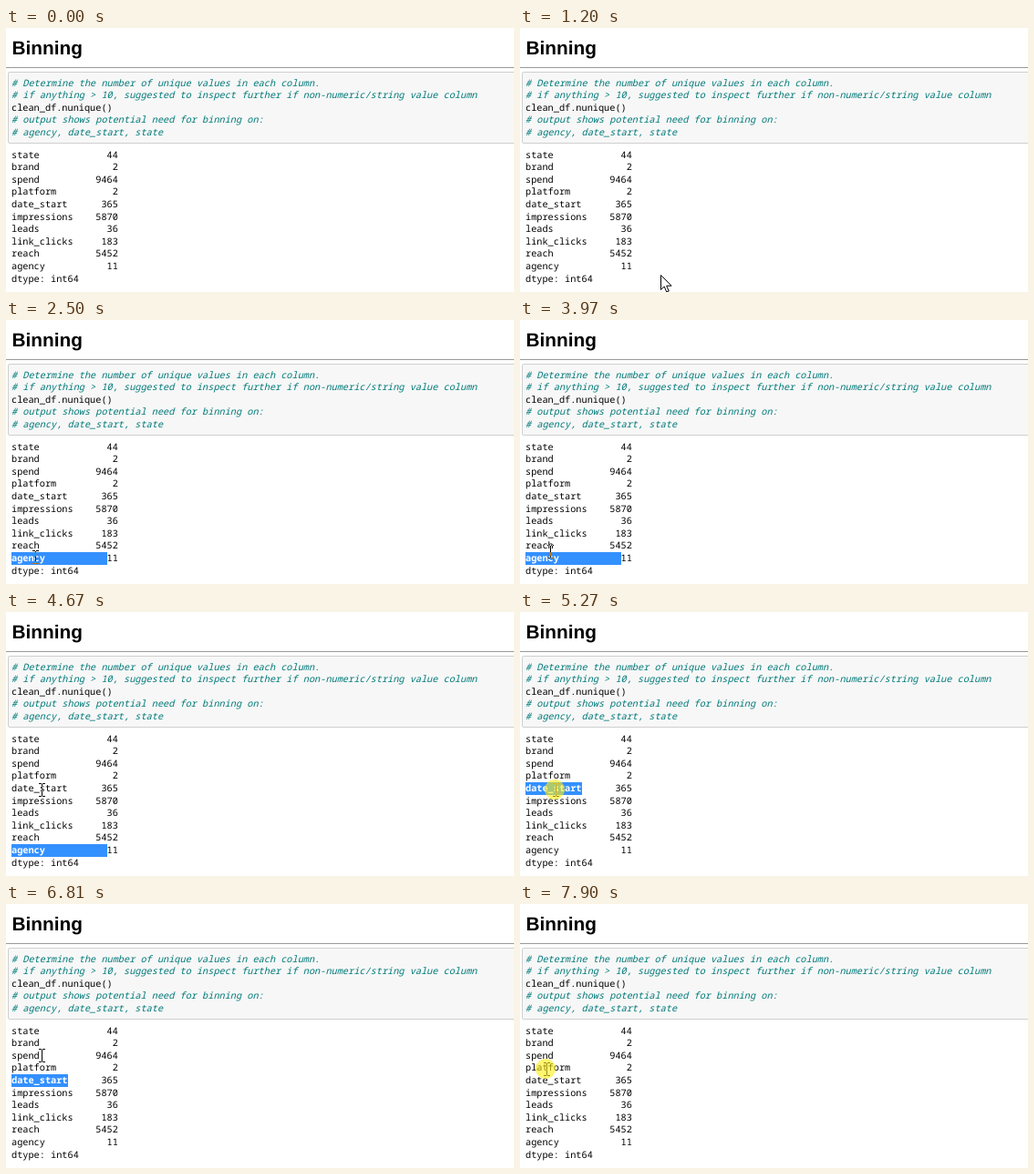
An HTML page for the animation above (8 s loop, 557 px wide and 290 px high).

```html
<!DOCTYPE html>
<html lang="en">
<head>
<meta charset="utf-8">
<title>Binning</title>
<style>
  html, body { margin: 0; height: 100%; overflow: hidden; background: #fff; }
  svg { display: block; width: 557px; height: 290px; }
  text { white-space: pre; text-rendering: geometricPrecision; }
  .mono { font: 10.267px "Noto Sans Mono", "DejaVu Sans Mono", monospace; }
  .note { font-style: italic; fill: #007979; }
  .title { font: bold 20.8px "Liberation Sans", Arial, sans-serif; }
  .sel rect { fill: #3390ff; }
  .sel text { fill: #fff; font-weight: 600; }
  #beam { fill: none; stroke: #fff; mix-blend-mode: difference; }
</style>
</head>
<body>
<svg viewBox="0 0 557 290">
  <rect width="557" height="290" fill="#fff"/>
  <text class="title" x="6.5" y="29">Binning</text>
  <path d="M0 43.5H557" stroke="#999"/>
  <rect x="2.5" y="48.5" width="570" height="78" rx="1.6" fill="#f7f7f7" stroke="#cfcfcf"/>
  <g id="page"></g>
  <path id="beam" d="M-3.5-7H-.5M.5-7H3.5M0-6.5V6.5M-3.5 7H-.5M.5 7H3.5"/>
  <circle id="spot" cx="-1.5" cy="-.5" r="11" fill="#ffee14" fill-opacity=".6"/>
  <path id="arrow" d="M0 0V16L3.7 12.5 6.3 18.5 8.7 17.5 6.2 11.7H11.5Z" fill="#fff" stroke="#000"/>
</svg>
<script>
const $ = id => document.getElementById(id);
const NS = "http://www.w3.org/2000/svg";
const LOOP = 8000, STEP = 70, DOUBLE = 200;
const LEFT = 6, CHAR = 6.16, LINE = 13.6, CODE_Y = 64, OUT_Y = 143, OUT_COLS = 19;

const code = [
  "# Determine the number of unique values in each column.",
  "# if anything > 10, suggested to inspect further if non-numeric/string value column",
  "clean_df.nunique()",
  "# output shows potential need for binning on:",
  "# agency, date_start, state"
];
const counts = {
  state: 44, brand: 2, spend: 9464, platform: 2, date_start: 365, impressions: 5870,
  leads: 36, link_clicks: 183, reach: 5452, agency: 11
};

function add(parent, tag, attrs, content = "") {
  const el = document.createElementNS(NS, tag);
  for (const key in attrs) el.setAttribute(key, attrs[key]);
  el.textContent = content;
  return parent.appendChild(el);
}

const baseline = (top, row) => Math.floor(top + row * LINE);
const write = (parent, content, y, cls = "mono") =>
  add(parent, "text", { x: LEFT, y, class: cls }, content);

function selection(word, chars = word.length) {
  const g = add($("page"), "g", { class: "sel" });
  const y = baseline(OUT_Y, Object.keys(counts).indexOf(word));
  add(g, "rect", { x: LEFT, y: y - 10, width: Math.round(chars * CHAR), height: 14 });
  write(g, word, y);
  return g;
}

code.forEach((line, i) =>
  write($("page"), line, baseline(CODE_Y, i), line[0] === "#" ? "mono note" : "mono"));
const output = Object.entries(counts).map(([k, v]) => k + String(v).padStart(OUT_COLS - k.length));
[...output, "dtype: int64"].forEach((line, i) => write($("page"), line, baseline(OUT_Y, i)));

// Each move starts where the one before it ended
const entry = { x: 340, y: 290 };
const moves = [
  { at: 920, steps: 12, x: 50.5, y: 260.5, ease: 1.9 },
  { at: 1760, steps: 3, x: 32.5, y: 260.5 },
  { at: 3970, steps: 11, x: 39.5, y: 195.5 },
  { at: 5930, steps: 8, x: 39.5, y: 176.5 },
  { at: 6670, steps: 5, x: 39.5, y: 160.5 },
  { at: 7020, steps: 4, x: 30.5, y: 172.5 },
  { at: 7510, steps: 3, x: 29.5, y: 181.5 }
];

// A double click selects on its second press; any press clears the previous selection
const clicks = [
  { at: 2230, hold: 70, sel: selection("agency", 17) },
  { at: 5070, hold: 130, sel: selection("date_start") },
  { at: 7900, hold: 100 }
];

const during = (t, from, length) => t >= from && t < from + length;
const show = (el, on) => { el.style.display = on ? "" : "none"; };
const snap = v => Math.floor(v) + .5;

function pointer(t) {
  const i = moves.filter(m => t >= m.at).length - 1;
  if (i < 0) return entry;
  const from = moves[i - 1] || entry, to = moves[i];
  const p = Math.min(1, (Math.floor((t - to.at) / STEP + 1e-6) + 1) / to.steps);
  const left = (1 - p) ** (to.ease || 1);
  return { x: snap(to.x + (from.x - to.x) * left), y: snap(to.y + (from.y - to.y) * left) };
}

function draw(t) {
  const { x, y } = pointer(t);
  const overText = x < LEFT + OUT_COLS * CHAR;
  show($("arrow"), !overText);
  show($("beam"), overText);
  show($("spot"), clicks.some(c => during(t, c.at, c.hold) || during(t, c.at + DOUBLE, c.hold)));
  for (const id of ["arrow", "beam", "spot"]) $(id).setAttribute("transform", `translate(${x} ${y})`);
  clicks.forEach((c, i) => {
    if (c.sel) show(c.sel, t >= c.at + DOUBLE && t < clicks[i + 1].at);
  });
}

const t0 = performance.now();
function tick() {
  draw((performance.now() - t0) % LOOP);
  requestAnimationFrame(tick);
}
tick();
</script>
</body>
</html>
```
